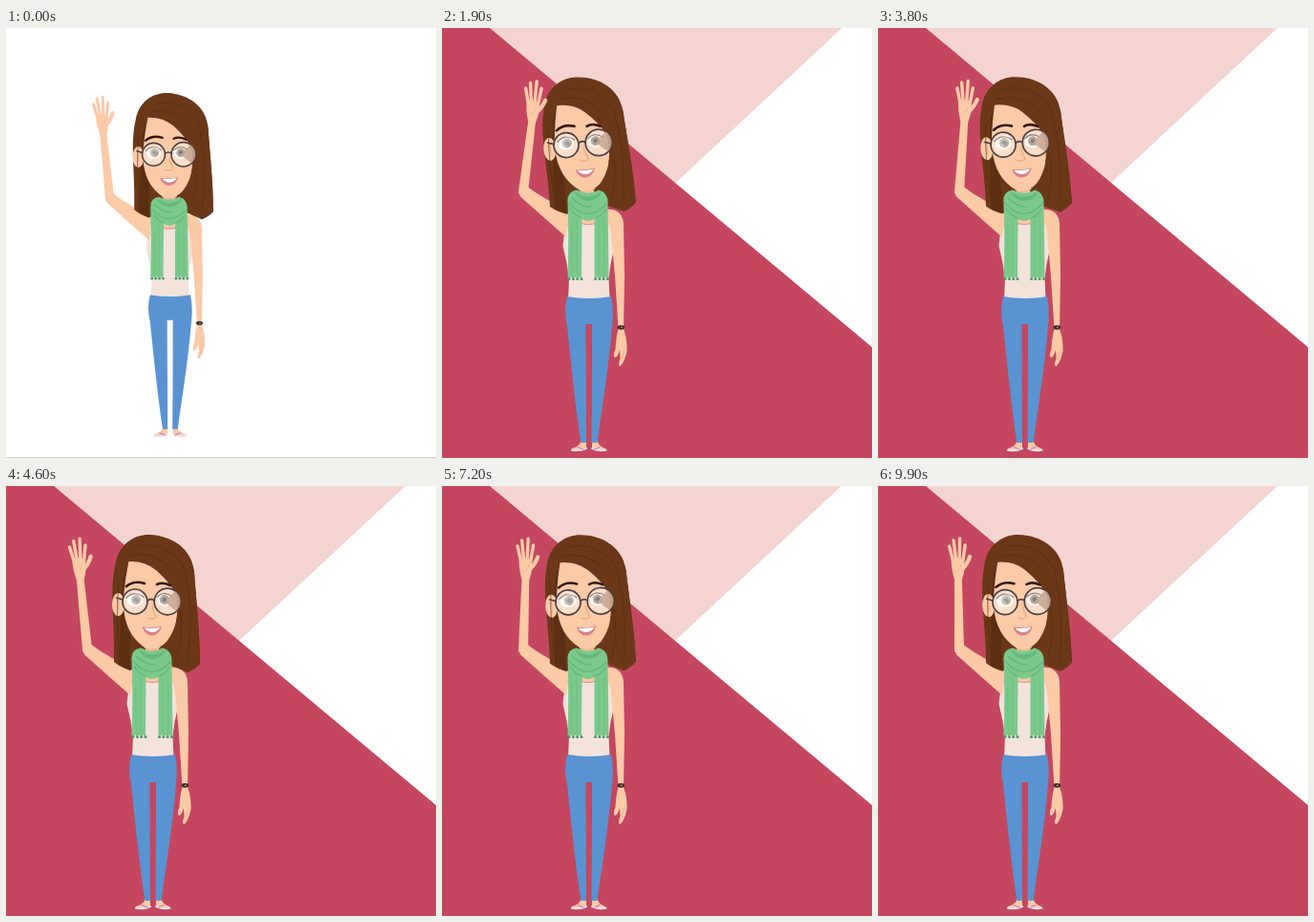
Write an HTML page that moves like this. It is 450 px wide and 450 px high and loops after 10 s.

```html
<!DOCTYPE html>
<html lang="en">
<head>
<meta charset="utf-8">
<title>Waving woman</title>
<style>
  html, body { margin: 0; width: 100%; height: 100%; overflow: hidden; background: #fff; }
  svg { display: block; width: 100vw; height: 100vh; }
  .skin { fill: #fbcaa7; }
  .hair { fill: #6a3819; }
  .scarf { fill: #7cc98d; }
  .line { fill: none; stroke-linecap: round; stroke-linejoin: round; }
  .fold { stroke: #65b67a; stroke-width: 1.2; }
  .strand { stroke: #562b12; stroke-width: 1; opacity: .6; }
  .finger { stroke: #fbcaa7; stroke-width: 4.2; }
  .brow { stroke: #32190f; stroke-width: 2.6; }
  .frame { stroke: #4c4143; stroke-width: 1.7; }
</style>
</head>
<body>
<svg viewBox="0 0 450 450">
  <rect width="450" height="450" fill="#fff"/>
  <path d="M0 449.5H450" stroke="#cfcfcf"/>
  <path id="pink" d="M-460 -460H912.5L246 160L180 221.4H-460Z" fill="#f3d4d1"/>
  <path id="red" d="M-20 -58.4L50 0L450 334L490 367.4V460H-20Z" fill="#c4475f"/>

  <g id="woman">
    <!-- feet and trousers -->
    <g class="skin">
      <path d="M145.5 432H151V439Q147 443 139 442.5Q134 442 136 440Q144 438 145.5 432Z"/>
      <path d="M157 432H162.500Q164 438 171 440Q173 442 168 442.500Q160 443 157 439Z"/>
    </g>
    <path class="line" d="M136 441.800Q145 443 151 440M171.500 441.800Q162 443 157 440" stroke="#efe3f0" stroke-width="2"/>
    <path class="line" d="M142 438.500L148 441M165 438.500L160 441" stroke="#c880b4" stroke-width="1.300"/>
    <path class="skin" d="M133 191Q153 185 182 191L177 232H130Z"/>
    <path d="M130 207Q127 218 126.500 228Q131 246 133 262L132 284H175.500L174.500 262Q176 246 180 231Q179 218 175 205L160 205Q153 207 146 205Z" fill="#f3e3db"/>
    <path class="line" d="M146 204.500Q153 206.500 160 204.500" stroke="#e58b96" stroke-width="1.200"/>
    <path d="M131 281Q154 285 177 281Q180 296 178 312C174 360 167 400 162.500 434H156.500C157 390 157 350 157 310H150.500C150.500 350 151 390 151 434H145.500C140 400 135 350 131 312Q127 296 131 281Z" fill="#5a93d2"/>

    <!-- lowered arm -->
    <path class="skin" d="M174 190Q189 190 190 205L191 260L190 315Q194 326 193.500 338Q191 350 186.500 354Q183.500 353 186.500 346L186 337Q184 344 181 345Q178.500 343 181.500 336Q182 324 184.500 315L181 260L177 216Z"/>
    <path class="line" d="M190.500 337L188 348" stroke="#eeb38d" stroke-width=".8"/>
    <ellipse cx="187.300" cy="313.300" rx="3.800" ry="2.400" fill="#3b302b"/>
    <circle cx="187.800" cy="313.300" r="1" fill="#a28c62"/>

    <path class="skin" d="M88 165Q110 182 134 190L130 219Q105 197 81.500 176Z"/>

    <g id="head">
      <path class="hair" d="M151 51C137 50 118 59 114.500 82C108 108 114 140 113 184Q120 190 130 193Q153 178 174 188L190 195Q199 191 203 186C203 155 200 130 197 90C195 66 174 52 151 51Z"/>
      <path d="M125 85C118 120 120 160 118 187L130 193V140Z" fill="#5c2f14"/>
      <path class="skin" d="M146 155H160V177Q153 181 146 177Z"/>
      <path class="line" d="M145 169Q153 174 161 169" stroke="#e8ae89" stroke-width="1.300"/>
      <ellipse class="skin" cx="117.500" cy="124" rx="6.500" ry="12"/>
      <path class="line" d="M115 117Q119 119 117.500 130" stroke="#e5a782" stroke-width="1"/>
      <path class="skin" d="M129 76Q160 74 178 100C184 126 179 151 167 164Q153 177 140 165C128 154 122 139 123 116Q125 95 129 76Z"/>
      <path class="hair" d="M128 79Q145 78 157 88Q172 101 178 114Q182 134 174 158Q170 172 168 177L190 195Q199 191 203 186C203 155 200 130 197 90C191 60 150 47 130 67Z"/>
      <path class="line strand" d="M131 73Q158 67 176 91M187 90Q197 130 190 185M180 120Q188 150 178 180M139 63Q172 57 190 92M118 100Q114 145 120 184"/>
      <path class="line brow" d="M126 105Q134 98.500 145 102M158 103Q164 100 172 104"/>

      <g id="eyes">
        <ellipse cx="135" cy="119.500" rx="8.500" ry="6.500" fill="#fffaf4"/>
        <ellipse cx="166" cy="119.500" rx="8" ry="6.500" fill="#fffaf4"/>
        <g fill="#85745c"><circle cx="136" cy="119" r="5"/><circle cx="166" cy="119" r="5"/></g>
        <g fill="#382b25"><circle cx="136" cy="119" r="2.300"/><circle cx="166" cy="119" r="2.300"/></g>
        <path class="line" d="M126 117Q134 109 144 116M158 116Q166 109 174 116" stroke="#5a4038" stroke-width="1.300"/>
      </g>
      <g id="lids" class="line" stroke="#51372d" stroke-width="1.500">
        <path d="M126 121Q135 126 144 121.500M157 121.500Q165 126 174 121"/>
      </g>

      <g fill="#fff" fill-opacity=".38">
        <circle class="frame" cx="135" cy="121" r="13"/>
        <circle class="frame" cx="169" cy="121" r="13.800"/>
      </g>
      <path d="M177 110A13.500 13.500 0 0 1 178 131L166 121Z" fill="#c5a58e" opacity=".85"/>
      <path d="M126 122L137 110L143 113L130 130Z" fill="#fff" opacity=".28"/>
      <path class="line frame" d="M148 120Q152 117 155.300 120M122 119L116 117"/>
      <path class="line" d="M153 125Q154 132 157 137Q153 141 148.500 138" stroke="#e9ad87" stroke-width="1.400"/>
      <path d="M142.500 147.500Q153 149 163 147Q160 157 151 156.500Q145 155 142.500 147.500Z" fill="#d9818b"/>
      <path d="M144.500 148.500Q153 149.500 161.500 148Q158 153.500 152 153Q147 152 144.500 148.500Z" fill="#fff"/>
    </g>

    <!-- scarf -->
    <path class="scarf" d="M131.500 181Q131 171 141 169.500Q153 176 164 169.500Q174 172 173.500 184L174.500 261H159.500V200Q153 204 146.500 200L146 261H131.500Q133 220 131.500 181Z"/>
    <path d="M139 171Q153 182 167 171Q165 180 153 181Q142 180 139 171Z" fill="#68b87c"/>
    <path class="line fold" d="M133 183Q143 195 153 194Q164 194 173 183M136 178Q147 188 156 187M146 199Q137 195 135 189M160 199Q168 196 171 190"/>
    <path class="line fold" d="M136 205V258M141 200V258M164 202V258M169.500 200V258" opacity=".45"/>
    <path class="line" d="M133 262.500H146M160.500 262.500H174" stroke="#4f9765" stroke-width="3" stroke-dasharray=".1 4.200"/>

    <g id="forearm">
      <path class="skin" d="M-4.500 2L-3.700 -76H4L5.500 -5Q4 6 -2 5Z"/>
      <g id="hand">
        <path class="skin" d="M-3.700 2Q-7 -9 -7 -18Q0 -24 6.500 -18Q8 -9 4 2Z"/>
        <path class="line finger" d="M-5 -17L-9 -33M-2 -18L-4.500 -39M1.500 -18L2 -41M5 -17L7.500 -34" style="stroke-width:3.400"/>
        <path class="line finger" d="M3 -8Q9 -12 12.500 -22"/>
        <path class="line" d="M-2 -6Q3 -9 3 -14" stroke="#edb28e" stroke-width=".8"/>
      </g>
    </g>
  </g>
</svg>
<script>
  const LOOP = 10000, STEP = 100;
  const WAVE_START = 204, WAVE_PERIOD = 490;
  const $ = id => document.getElementById(id);
  const move = (id, value) => $(id).setAttribute('transform', value);
  const clamp = v => Math.min(1, Math.max(0, v));
  const mix = (a, b, p) => a + (b - a) * p;
  const easeOut = p => 1 - (1 - p) ** 3;
  const easeInOut = p => (1 - Math.cos(Math.PI * p)) / 2;

  function backdrop(t) {
    const rise = easeOut(clamp(t / 800));
    move('red', `translate(0 ${mix(510, 0, rise)})`);
    const drop = easeOut(clamp(t / 800));
    const settle = easeInOut(clamp((t - 900) / 1200));
    // the slanted edge overshoots by 10px before it settles
    move('pink', `translate(${mix(-430, 10, drop) - 10 * settle} 0)`);
  }

  function woman(t) {
    const zoom = easeInOut(clamp(t / 1950));
    const x = mix(171, 153, zoom), y = mix(427, 442, zoom), s = mix(0.918, 1, zoom);
    move('woman', `translate(${x} ${y}) scale(${s}) translate(-153 -442)`);

    const wave = Math.cos(2 * Math.PI * Math.max(0, t - WAVE_START) / WAVE_PERIOD);
    const bend = 1 - 6.5 * wave;
    move('head', `rotate(${2.3 * (wave - 1)} 152 185)`);
    move('forearm', `translate(84.5 171) rotate(${bend})`);
    move('hand', `translate(0 -75) rotate(${-0.4 * bend})`);

    const blink = Math.abs((t + 2300) % 3000 - 1500) < 150;
    $('eyes').style.display = blink ? 'none' : '';
    $('lids').style.display = blink ? '' : 'none';
  }

  function draw(now) {
    const t = Math.floor(now % LOOP / STEP) * STEP;
    backdrop(t);
    woman(t);
    requestAnimationFrame(draw);
  }
  draw(performance.now());
</script>
</body>
</html>
```
